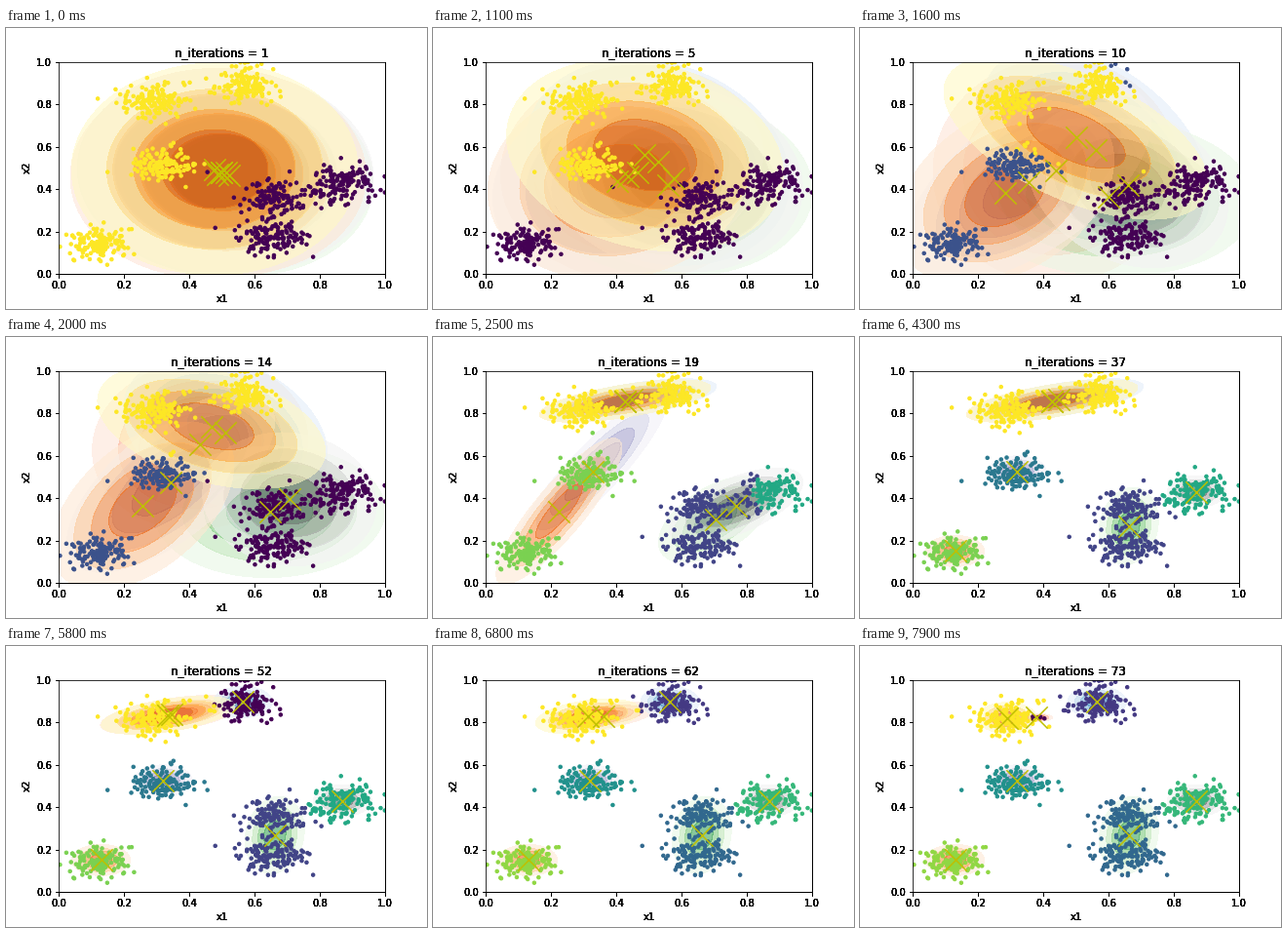
These frames come from a looping animation (432x288 px, 8000 ms). A matplotlib script:

```python
import numpy as np
import matplotlib.pyplot as plt
from matplotlib.animation import FuncAnimation

plt.rcParams["font.family"] = "DejaVu Sans"
rng = np.random.default_rng(7)

SPREAD = np.array([.05, .041])
BLOBS = {"A": (.13, .15), "B": (.32, .525), "C": (.29, .82), "D": (.565, .895),
         "E": (.87, .43), "F": (.67, .36), "G": (.655, .175), "H": (.38, .822)}
ALL = "ABCDEFG"
STRAYS = [(.15, .48), (.456, .48), (.48, .217), (.12, .826), (.78, .08)]


def spread(name):
    """Blob H is only a small clump on the edge of C."""
    return SPREAD * (.55, .25) if name == "H" else SPREAD


def sample(name):
    size = 6 if name == "H" else 140
    return rng.normal(BLOBS[name], spread(name), (size, 2))


points = np.clip(np.vstack([sample(b) for b in ALL]), 0, 1)
rng.shuffle(points)
points = np.vstack([points, STRAYS, sample("H")])


class Component:
    """A Gaussian fitted to the blobs it owns at each stage.

    Stages are (iteration, owned blobs, share); a repeated letter means
    a stronger hold on that blob.
    """

    def __init__(self, cmap, *stages):
        self.colors = plt.get_cmap(cmap)(np.linspace(.1, .65, 4))
        self.times = [stage[0] for stage in stages]
        self.states = np.array([self.fit(*stage[1:]) for stage in stages]).T

    @staticmethod
    def fit(owned, share=1):
        centers = np.array([BLOBS[b] for b in owned])
        within = np.mean([spread(b) ** 2 for b in owned], axis=0)
        mean = centers.mean(axis=0)
        offsets = centers - mean
        cov = offsets.T @ offsets / len(owned) + np.diag(within)
        return [*mean, *cov.flat, share]

    def at(self, n):
        state = [np.interp(n, self.times, row) for row in self.states]
        return np.array(state[:2]), np.reshape(state[2:6], (2, 2)), state[6]


COMPONENTS = [
    Component("Reds", (1, ALL * 4 + "A"), (10, "ABCDFG"), (19, "CD", .1),
              (37, "CD", .1), (52, "CCCCD", .08), (73, "H", .05)),
    Component("Blues", (1, ALL), (10, "BCDDEFG"), (19, "CCCDDDD", .1),
              (37, "CCCDDDD", .1), (52, "D")),
    Component("Greens", (1, ALL * 4 + "EFG"), (10, "ACEEFFGG"),
              (19, "EFFGG"), (29, "FG")),
    Component("Purples", (1, ALL), (10, "AABBDF", .8), (19, "ABBBBBD", .25),
              (29, "BBBBBBBC", .2), (37, "B")),
    Component("Greys", (1, ALL * 4 + "E"), (10, "BDEEFFGG"),
              (19, "EEEFFG", .5), (29, "EEEEEEEF", .4), (37, "E", .6)),
    Component("Oranges", (1, ALL), (10, "AAABBCF"), (19, "AABB"),
              (29, "AAABB"), (37, "A")),
    Component("YlOrBr", (1, ALL * 4 + "ABCD"), (10, "BCCDEF"), (19, "CD"),
              (37, "CD"), (52, "CCCCCD"), (73, "C")),
]

# Components that own points, from the given iteration on.
ACTIVE = {1: "26", 6: "236", 15: "123456", 24: "23456", 33: "123456",
          60: "0123456"}

axis = np.linspace(0, 1, 150)
GRID = np.stack(np.meshgrid(axis, axis), axis=-1)
LEVELS = [.2, .4, .6, .8, 1.01]


def bell(xy, mean, cov):
    """Gaussian with a peak of 1."""
    d = xy - mean
    return np.exp(-.5 * ((d @ np.linalg.inv(cov)) * d).sum(axis=-1))


def score(mean, cov, share):
    return share * bell(points, mean, cov) / np.sqrt(np.linalg.det(cov))


def relative_labels(n, states):
    """Owner of each point, scaled to 0..1 over the active components."""
    active = [int(c) for c in ACTIVE[max(t for t in ACTIVE if t <= n)]]
    best = np.argmax([score(*states[i]) for i in active], axis=0)
    labels = np.array(active)[best]
    return (labels - active[0]) / (active[-1] - active[0])


fig = plt.figure(figsize=(6, 4), dpi=72, facecolor="white")


def make_axes():
    ax = fig.add_axes([.125, .125, .775, .755], facecolor="none")
    ax.set(xlim=(0, 1), ylim=(0, 1), xlabel="x1", ylabel="x2")
    return ax


# Stacked identical axes give the text its heavy edges.
layers = [make_axes() for _ in range(6)]
for layer in layers[1:]:
    layer.spines[["left", "top"]].set_visible(False)
ax = layers[0]
dots = ax.scatter(*points.T, c=np.zeros(len(points)), s=12, cmap="viridis",
                  vmin=0, vmax=1, zorder=2)
crosses = ax.scatter([], [], marker="x", s=500, color="y", linewidths=1.5,
                     zorder=2.2)
contours = []


def update(frame):
    n = max(1, frame - 6)
    states = [c.at(n) for c in COMPONENTS]

    while contours:
        contours.pop().remove()
    for comp, (mean, cov, _) in zip(COMPONENTS, states):
        contours.append(ax.contourf(axis, axis, bell(GRID, mean, cov), LEVELS,
                                    colors=comp.colors, alpha=.6, zorder=1))

    dots.set_array(relative_labels(n, states))
    crosses.set_offsets([mean for mean, *_ in states])
    for layer in layers:
        layer.set_title(f"n_iterations = {n}")


anim = FuncAnimation(fig, update, frames=80, interval=100, repeat=True,
                     repeat_delay=0, init_func=lambda: None, blit=False)
plt.show()
```
